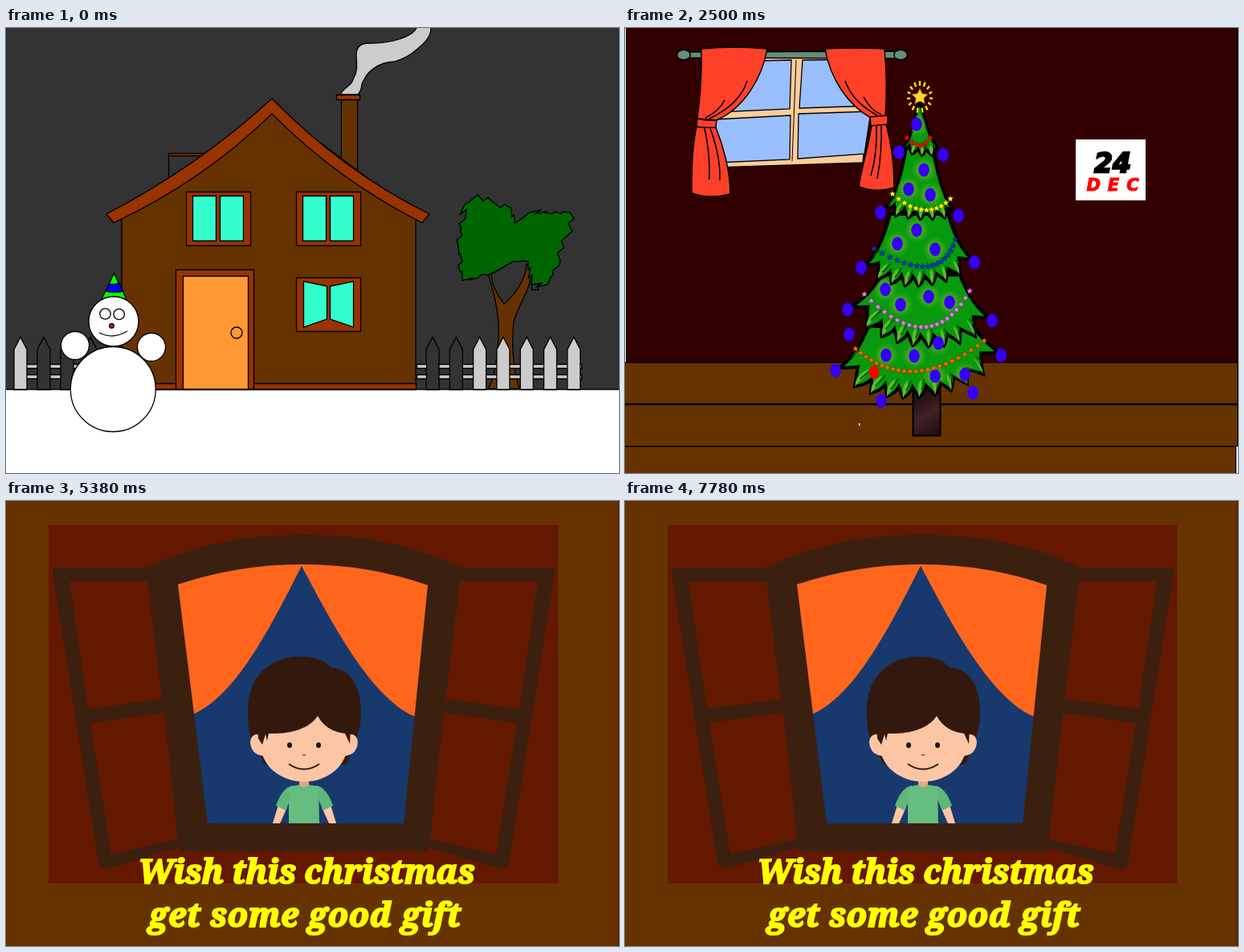
An HTML page with a canvas for the animation above (8000 ms loop, 763x555 px).

```html
<!DOCTYPE html>
<html lang="en">
<head>
<meta charset="utf-8">
<title>Christmas wish</title>
<style>
html, body { margin: 0; width: 100%; height: 100%; overflow: hidden; background: #333; }
canvas { display: block; }
</style>
</head>
<body>
<canvas id="stage" width="763" height="555"></canvas>
<script>
const W = 763, H = 555, LOOP = 8000;
const view = document.getElementById('stage').getContext('2d');
const layer = document.createElement('canvas');
layer.width = W;
layer.height = H;
const c = layer.getContext('2d');

const lerp = (a, b, u) => a + (b - a) * u;

function random(seed) {
  return () => (seed = (seed * 16807) % 2147483647) / 2147483647;
}
function shape(d, fill, line, width = 1.3) {
  const p = typeof d === 'string' ? new Path2D(d) : d;
  if (fill) { c.fillStyle = fill; c.fill(p); }
  if (line) { c.strokeStyle = line; c.lineWidth = width; c.stroke(p); }
}
function box(x, y, w, h, fill, line = '#000', width = 1.3) {
  const p = new Path2D();
  p.rect(x + 0.5, y + 0.5, w, h);
  shape(p, fill, line, width);
}
function oval(x, y, rx, ry, fill, line, width) {
  const p = new Path2D();
  p.ellipse(x, y, rx, ry, 0, 0, Math.PI * 2);
  shape(p, fill, line, width);
}
function rect(x, y, w, h, fill) {
  c.fillStyle = fill;
  c.fillRect(x, y, w, h);
}
function label(s, x, y, font, color, edge, gap = 0) {
  c.font = 'italic 900 ' + font;
  c.textAlign = 'center';
  c.letterSpacing = gap + 'px';
  c.fillStyle = c.strokeStyle = color;
  c.lineWidth = edge;
  c.fillText(s, x + gap / 2, y);
  c.strokeText(s, x + gap / 2, y);
}
// draw once, then again mirrored about a vertical axis
function both(axis, draw) {
  draw();
  c.save();
  c.translate(axis * 2, 0);
  c.scale(-1, 1);
  draw();
  c.restore();
}

/* ---- house in the snow ---- */

const RUST = '#993300', WOOD = '#663300', PANE = '#33ffcc', GREY = '#cccccc', NIGHT = '#333333';

function fence(x, n, step, dark) {
  for (const y of [419, 432]) box(x, y, n * step - 12, 5, GREY);
  for (let i = 0; i < n; i++) {
    const px = x + i * step;
    shape(`M${px} 451V401l8 -15.5l8 15.5V451Z`, dark(i) ? NIGHT : GREY, '#000');
  }
}
function win(x, y) {
  box(x, y, 80, 67, RUST);
  for (const dx of [8, 42]) box(x + dx, y + 5, 29, 56, PANE);
}
// outline through key points, broken into seeded steps
function jagged(pts, size, seed) {
  const p = new Path2D(), rnd = random(seed);
  pts.forEach(([x, y], i) => {
    const [ex, ey] = pts[(i + 1) % pts.length];
    const n = Math.max(1, Math.round(Math.hypot(ex - x, ey - y) / 10));
    p.lineTo(x, y);
    for (let k = 1; k < n; k++) {
      const px = lerp(x, ex, k / n), py = lerp(y, ey, k / n), d = (rnd() - 0.5) * size;
      p.lineTo(px + d, py - d);
      p.lineTo(px - d, py + d * 0.6);
    }
  });
  p.closePath();
  return p;
}
function tree() {
  shape('M598 300C606 325 615 356 613 386C611 418 608 437 600 450H639C634 436 628 402 632 366C638 344 654 326 656 296L648 295C647 313 635 331 620 344C611 333 605 319 604 308Z', WOOD, '#000');
  box(654, 319, 8, 7, NIGHT);
  const crown = [[571, 220], [587, 208], [607, 218], [629, 225], [633, 243], [652, 230], [702, 230],
    [705, 253], [691, 266], [690, 290], [674, 320], [654, 320], [650, 291], [632, 291], [600, 308], [568, 315], [563, 271]];
  shape(jagged(crown, 8, 77), '#006600', '#000');
}
function snowman() {
  const ball = (x, y, r) => oval(x, y, r, r, '#fff', '#000');
  ball(86, 396, 17.5);
  ball(181, 398, 17.5);
  ball(133.3, 450.5, 53);
  shape('M134.5 306L119 338H150Z', '#00ff00', '#000');
  shape('M128.5 319Q135 321 140.5 318L146 328Q135 331 124 328Z', '#0000ff', '#000');
  ball(134, 366, 31);
  ball(123.5, 356.5, 6.7);
  ball(140.7, 357, 6.7);
  oval(131.5, 371.5, 2.8, 2.8, '#ff0000', '#000');
  shape('M116 380Q133 389 151 378', null, '#000');
}

function house() {
  rect(0, 0, W, H, NIGHT);
  rect(0, 451, W, H - 451, '#fff');
  rect(0, 450, W, 1.3, '#000');
  fence(10, 4, 29, i => i > 0);

  // smoke, chimney, dormer
  shape('M416 83C420 74 431 72 432 64C439 53 436 42 436 32C437 22 443 19 451 19C478 20 506 11 511 0V-4H529V0C529 12 520 20 506 31C498 37 490 40 483 42C463 43 450 54 445 66C440 71 446 73 438 83Z', GREY, '#000');
  box(417, 89, 20, 90, WOOD);
  box(411, 83, 29, 6, RUST);
  box(202, 157, 44, 30, NIGHT);
  box(202, 156, 44, 3, RUST);

  // walls, roof, openings
  shape('M144 451V232L331 98L510 232V451Z', WOOD, '#000');
  box(144, 443, 366, 7, RUST);
  shape('M125 232Q240 172 331 88Q420 179 527 232L518 243Q413 190 331 107Q245 191 134 243Z', RUST, '#000');
  win(224, 204);
  win(361, 204);
  box(361, 311, 80, 67, RUST);
  both(401.5, () => shape('M370.5 316L399.5 322V363L370.5 373Z', PANE, '#000'));
  box(211, 301, 97, 149, RUST);
  box(220, 309, 81, 141, '#ff9933');
  oval(287, 380, 7, 7, null, '#000');

  tree();
  fence(523, 7, 29.3, i => i < 2);
  for (const y of [419, 432]) box(511, y, 12, 5, GREY);
  rect(0, 450, 80, 1.3, '#000');
  rect(511, 450, W - 511, 1.3, '#000');
  snowman();
}

/* ---- decorated tree ---- */

// left and right tip, sag and number of leaves, top edge, inner baubles
const TIERS = [
  { l: [266, 424], r: [466, 405], sag: 46, n: 11, top: [303, 433, 372], balls: [[390, 393], [325, 408], [360, 409], [386, 434], [423, 432]] },
  { l: [281, 348], r: [455, 362], sag: 42, n: 10, top: [320, 417, 308], balls: [[324, 326], [343, 345], [378, 335], [404, 342]] },
  { l: [298, 296], r: [433, 289], sag: 29, n: 9, top: [330, 402, 232], balls: [[363, 252], [339, 269], [386, 276]] },
  { l: [322, 227], r: [413, 231], sag: 9, n: 7, top: [350, 383, 150], balls: [[372, 177], [353, 201], [380, 208]] },
  { l: [345, 152], r: [394, 155], sag: 5, n: 5, top: [365, 368, 95], balls: [[363, 120]] }
];
const LOW_BALLS = [[279, 382], [319, 465], [433, 455]];
const LIGHTS = ['#ff0000', '#99ff00', '#3300ff'];

function star(x, y, r, fill, line, width) {
  const p = new Path2D();
  for (let i = 0; i < 10; i++) {
    const a = i * Math.PI / 5 - Math.PI / 2, q = i % 2 ? r * 0.5 : r;
    p.lineTo(x + q * Math.cos(a), y + q * Math.sin(a));
  }
  p.closePath();
  shape(p, fill, line, width);
}
function glow([x, y]) {
  const g = c.createRadialGradient(x, y, 5, x, y, 16);
  g.addColorStop(0, 'rgba(135,190,40,.7)');
  g.addColorStop(1, 'rgba(90,170,30,0)');
  rect(x - 16, y - 16, 32, 32, g);
}
function tier({ l, r, sag, n, top: [x0, x1, y0], balls }) {
  const mid = (x0 + x1) / 2, p = new Path2D();
  const tips = Array.from({ length: n }, (_, i) => {
    const u = i / (n - 1), drop = (1 - (2 * u - 1) ** 2) ** 0.6;
    return [lerp(l[0], r[0], u), lerp(l[1], r[1], u) + sag * drop];
  });
  const notch = Math.min(13, (r[0] - l[0]) / n * 0.75);
  p.moveTo(x0, y0);
  p.quadraticCurveTo(lerp(x0, l[0], 0.4), l[1] - 14, ...l);
  for (let i = 1; i < n; i++) {
    const [ax, ay] = tips[i - 1], [bx, by] = tips[i];
    const vx = lerp((ax + bx) / 2, mid, 0.15), vy = (ay + by) / 2 - notch;
    p.quadraticCurveTo(lerp(ax, vx, 0.7), lerp(ay, vy, 0.3), vx, vy);
    p.quadraticCurveTo(lerp(bx, vx, 0.3), lerp(by, vy, 0.3), bx, by);
  }
  p.quadraticCurveTo(lerp(x1, r[0], 0.4), r[1] - 14, x1, y0);
  p.closePath();
  shape(p, '#069a0c', '#000', 4);

  c.save();
  c.clip(p);
  for (const [x, y] of tips) {
    const dx = (mid - x) * 0.2;
    shape(`M${x} ${y}q${dx * 0.3 + 5} -9 ${dx + 2} ${-notch * 1.7}q${-dx * 0.7 - 6} 7 ${-dx - 2} ${notch * 1.7}`, '#62bb2c');
    shape(`M${x + dx + 6} ${y - notch * 1.7}q${-dx * 0.6} 7 ${-dx * 0.8 - 3} ${notch}`, null, '#04600a', 1.8);
  }
  balls.forEach(glow);
  c.restore();
}
function garland(color, n, [x0, y0], [cx, cy], [x1, y1]) {
  for (let i = 0; i < n; i++) {
    const u = i / (n - 1);
    const x = lerp(lerp(x0, cx, u), lerp(cx, x1, u), u);
    const y = lerp(lerp(y0, cy, u), lerp(cy, y1, u), u);
    star(x, y, 4, color, 'rgba(0,0,0,.4)', 0.6);
  }
}
function curtains() {
  const red = '#ff4029', cream = '#ffcc99', sky = '#99bfff', rod = '#668f7a';
  const cloth = d => shape(d, red, '#000', 1.5);
  shape('M112 39L310 33L296 168L114 174Z', cream, '#000', 1.5);
  for (const d of ['M118 42L207 40L205 101L112 105Z', 'M221 40L306 39V97L217 100Z',
    'M112 114L206 109L205 164L113 168Z', 'M216 107L306 104L298 157L215 163Z']) shape(d, sky, '#000');
  shape('M213 40L208 166', null, '#000', 1);
  shape('M74 30L343 29V38L74 37Z', rod, '#000', 1.5);
  for (const x of [73, 343]) oval(x, 33.5, 8.3, 6.3, rod, '#000', 1.5);

  cloth('M95 26Q135 22 177 26C171 62 148 100 114 115L90 113Q96 70 95 26Z');
  cloth('M89 123C83 150 83 180 83 206Q106 214 131 207C131 178 122 146 113 124Z');
  cloth('M90 113Q102 116 114 115L113 124Q101 125 89 123Z');
  cloth('M249 26Q287 24 323 26Q327 70 324 109L306 112C277 96 255 62 249 26Z');
  cloth('M307 121C303 150 294 175 291 198Q313 206 335 199C335 170 331 142 325 120Z');
  cloth('M305 111L327 109V120L306 122Z');
  shape('M152 66Q143 95 105 113M124 90Q117 104 100 112M99 125Q106 155 105 189M106 125Q119 160 118 190M274 66Q283 92 314 109M297 86Q306 103 319 108M313 122Q314 158 306 184M319 122Q320 155 314 188', null, '#000', 1.6);
}
function baubles(t) {
  // the lights change every 400 ms, with one step held 80 ms longer
  const step = Math.max(0, Math.floor((t - (t < 4100 ? 500 : 580)) / 400));
  const color = LIGHTS[step % 3];
  for (const { l, r, balls } of TIERS) {
    const ends = [[l[0] - 4, l[1] + 3], [r[0] + 2, r[1] + 3]];
    for (const [x, y] of [...balls, ...ends]) oval(x, y, 6.8, 8.6, color);
  }
  for (const [x, y] of LOW_BALLS) oval(x, y, 6.8, 8.6, color);
  oval(310, 429.5, 6.5, 8.4, LIGHTS[0]);
}

function room(t) {
  rect(0, 0, W, H, '#330000');
  rect(0, 0, 1, 417, '#fff');
  rect(1, 0, 1, 417, '#000');
  rect(761, 0, 1, 417, '#000');
  rect(0, 417, W, H - 417, WOOD);
  rect(0, 416.5, W, 1.3, '#000');
  rect(0, 468, W, 2.5, '#000');
  rect(0, 521, W, 1.5, '#000');
  rect(762, 417, 1, 105, '#000');
  rect(760, 522, 1, 33, '#000');
  rect(761, 522, 2, 33, '#fff');
  curtains();

  const wide = 'px "DejaVu Sans", Inter, sans-serif';
  rect(561, 139, 87, 76, '#fff');
  label('24', 607, 180, 33 + wide, '#000', 2.4);
  label('DEC', 607, 203, 21 + wide, '#ff0000', 1, 9);

  const bark = c.createLinearGradient(358, 450, 393, 509);
  bark.addColorStop(0, '#150808');
  bark.addColorStop(0.55, '#422026');
  bark.addColorStop(1, '#1b0b0b');
  box(358, 440, 34, 68, bark, '#000', 2);
  TIERS.forEach(tier);

  for (let i = 0; i < 15; i++) {
    const a = i * Math.PI * 2 / 15 + 0.1, u = Math.cos(a), v = Math.sin(a);
    shape(`M${367 + u * 12} ${86 + v * 14}L${367 + u * 16} ${86 + v * 20}`, null, '#ffdd11', 2.4);
  }
  star(367, 86, 10.5, '#ffd633', '#8a5a00', 1);

  baubles(t);
  garland('#ff0000', 6, [351, 137], [368, 156], [380, 137]);
  garland('#ffff00', 12, [333, 207], [375, 244], [405, 213]);
  garland('#0033cc', 17, [310, 275], [393, 325], [411, 264]);
  garland('#ee77ee', 20, [298, 332], [380, 416], [429, 328]);
  garland('#ff6600', 23, [287, 400], [357, 461], [447, 390]);
  rect(291, 493, 1.5, 3, '#fff');
}

/* ---- boy at the window ---- */

const FRAME = '#3b200f', HAIR = '#33190d', SKIN = '#fcc6a5', BRICK = '#641800';

function boy(open) {
  shape('M307 300L322 328Q371 340 424 328L435 300Z', HAIR);
  shape('M301 262C301 216 331 194 366 194C386 194 397 199 404 208C430 208 442 233 442 264C442 282 437 293 435 303L307 302C302 290 301 276 301 262Z', HAIR);
  rect(365, 346, 12, 12, '#e9a583');
  both(371.5, () => {
    shape('M339 379L332 402H341L350 382Z', SKIN);
    shape('M357 355Q344 357 336 380L348 386L356 368Z', '#5fb87a');
  });
  shape('M354 356L365 354Q371 360 377 354L389 356L390 402H352V368Z', '#66bd80');
  both(371, () => shape('M318 292C307 288 302 297 305 306C307 314 313 317 320 318Z', SKIN));
  shape('M316 266H426V300C425 332 399 350 371 350C343 350 317 332 316 300Z', SKIN);
  shape('M312 258H430L428 303L422 290Q398 287 388 268C377 285 352 291 327 290L325 299L323 291L319 304L314 296Z', HAIR);
  for (const x of [353, 389]) oval(x, 304.5, 3, 3.6, '#24140c');
  shape('M369 316Q371 318 373 316', null, '#8a4a30');
  if (open) shape('M353 328.5Q371 332 389 328.5Q371 345 353 328.5Z', '#5a1712', HAIR, 1.8);
  else shape('M352 328Q371 341 390 328', null, HAIR, 2);
}

function wish(t) {
  rect(0, 0, W, H, WOOD);
  rect(761.5, 0, 1.5, H, '#4a2400');
  rect(53, 30, 634, 447, BRICK);
  both(370.5, () => {
    shape('M62 83H182L222 430L126 459Q117 460 115 451L58 90Q57 83 62 83Z', FRAME);
    shape('M79 100H176L194 247L102 259Z', BRICK);
    shape('M105 277L197 264L214 422L131 440Z', BRICK);
  });
  shape('M178 82Q260 42 370 42Q480 42 565 82L526 437H216Z', FRAME);
  const opening = new Path2D('M214 104Q290 79 369 79Q450 79 525 105L495 402H251Z');
  shape(opening, '#17396d');
  c.save();
  c.clip(opening);
  shape('M368 81C335 145 290 240 235 265L200 270V70H368Z', '#ff661c');
  shape('M368 81C402 145 452 243 507 268L540 272V70H368Z', '#ff661c');
  c.restore();
  boy(t >= 5380 && Math.floor((t - 5380) / 240) % 2 === 1);
  const serif = '41px "Noto Serif", "Liberation Serif", serif';
  label('Wish this christmas', 374, 477, serif, '#ffff00', 2.2);
  label('get some good gift', 372, 531, serif, '#ffff00', 2.2, 0.7);
}

/* ---- timeline ---- */

const SCENES = [[house, 0], [room, 500], [wish, 5300]];
const FADE = 80;

function paint(t) {
  for (const [scene, from] of SCENES) {
    if (t < from) break;
    scene(t);
    view.globalAlpha = from && t < from + FADE ? 0.5 : 1;
    view.drawImage(layer, 0, 0);
  }
}
const start = performance.now();
function tick(now) {
  paint(Math.max(0, now - start) % LOOP);
  requestAnimationFrame(tick);
}
requestAnimationFrame(tick);
</script>
</body>
</html>
```
